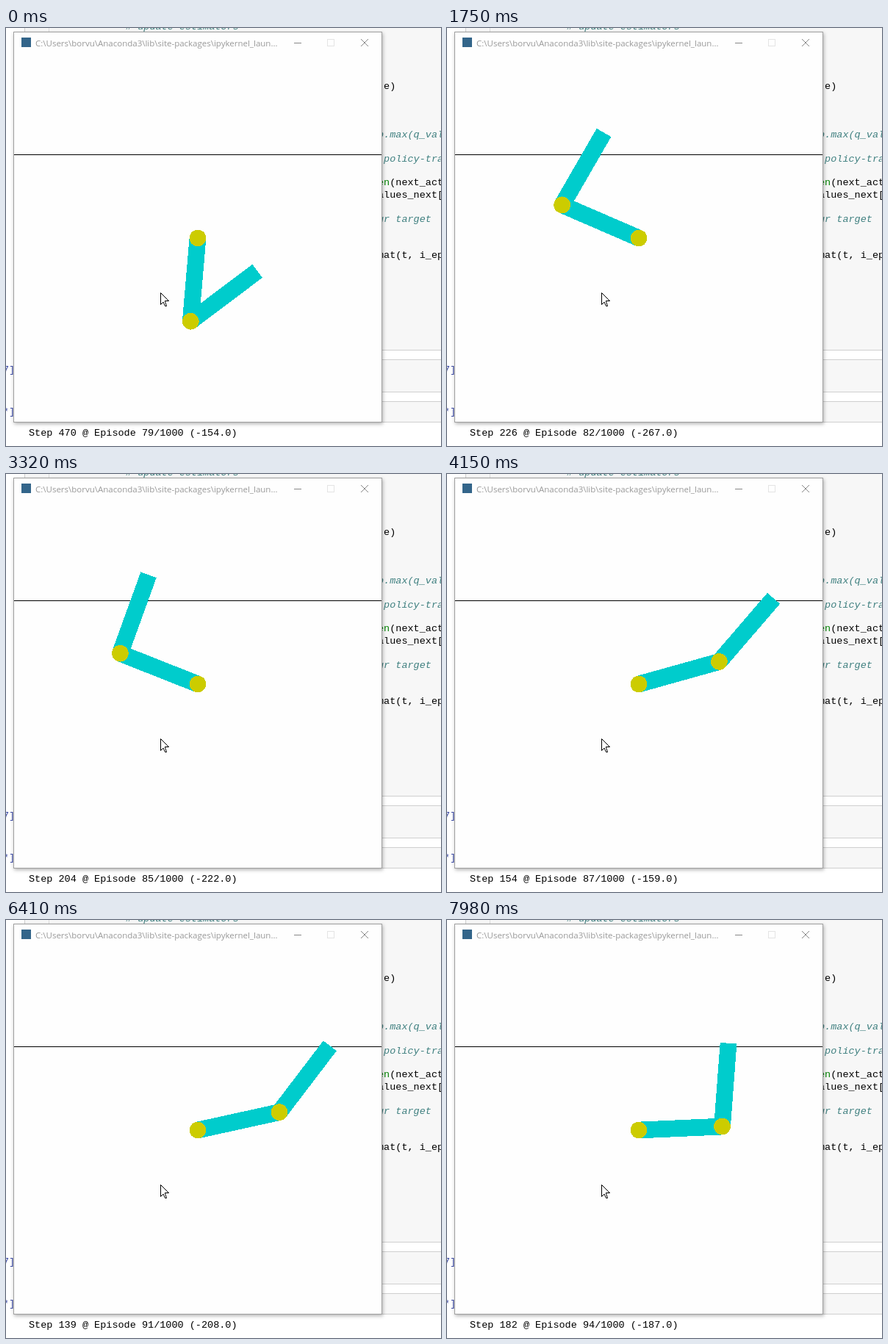
An HTML page that plays this animation: 592 px wide and 569 px high, repeating every 8000 ms.

```html
<!DOCTYPE html>
<html lang="en">
<head>
<meta charset="utf-8">
<title>Acrobot training</title>
<style>
  html, body { margin: 0; width: 100%; height: 100%; overflow: hidden; background: #fff; }
  svg { display: block; }
  text { white-space: pre; }
  .mono { font: 13.5px "Liberation Mono", "Courier New", monospace; fill: #000; }
  .comment { font-style: italic; fill: #408080; }
  .builtin { fill: #008000; }
  .prompt { fill: #303f9f; }
  .title { font: 11.5px "Open Sans", sans-serif; fill: #999; }
  .cell { fill: #f7f7f7; stroke: #cfcfcf; }
  .window { fill: #fefefe; stroke: #a0a0a0; filter: drop-shadow(1px 2px 2.5px rgba(0, 0, 0, .3)); }
  .link { fill: #0cc; shape-rendering: crispEdges; }
  .joint { fill: #cc0; shape-rendering: crispEdges; }
</style>
</head>
<body>
<svg width="592" height="569" viewBox="0 0 592 569">
  <defs>
    <g id="segment">
      <rect class="link" y="-11.36" width="113.64" height="22.73"/>
      <circle class="joint" r="11.36"/>
    </g>
  </defs>

  <!-- notebook -->
  <rect class="cell" x="25.5" y="-9.5" width="600" height="448"/>
  <path d="M58.5 0V5" stroke="#ddd"/>
  <rect class="cell" x="25.5" y="451.5" width="600" height="44"/>
  <rect class="cell" x="25.5" y="508.5" width="600" height="28"/>
  <text class="mono comment" x="163" y="2"># update estimators</text>
  <g class="mono">
    <text x="506" y="83"> e)</text>
    <text x="506" y="149" class="comment">p.max(q_val</text>
    <text x="506" y="182" class="comment"> policy-tra</text>
    <text x="506" y="214"><tspan class="builtin">en</tspan>(next_act</text>
    <text x="506" y="231">alues_next[</text>
    <text x="506" y="264" class="comment">ur target</text>
    <text x="506" y="313">mat(t, i_ep</text>
  </g>
  <text class="mono prompt" x="-4" y="469">7]</text>
  <text class="mono prompt" x="-4" y="526">*]</text>
  <text class="mono" id="status" x="31" y="555"></text>

  <!-- window -->
  <rect class="window" x="10.5" y="5.5" width="501" height="531"/>
  <rect x="21" y="13" width="13" height="13" fill="#33658a"/>
  <text class="title" x="40" y="24.5">C:\Users\borvu\Anaconda3\lib\site-packages\ipykernel_laun...</text>
  <g fill="none">
    <path d="M392 20.5H402" stroke="#888"/>
    <rect x="437.5" y="15.5" width="9" height="9" stroke="#e4e4e4"/>
    <path d="M483 15L493 25M493 15L483 25" stroke="#888"/>
  </g>

  <!-- acrobot -->
  <path d="M11 172.5H511" stroke="#000"/>
  <use href="#segment" id="upper"/>
  <use href="#segment" id="lower"/>
  <path d="M210.5 360.5V376.5L214 373L216.5 378.5H218.5L216.3 371.5H221.5Z" fill="#fff" stroke="#000"/>
</svg>
<script>
const LOOP = 8000;
const TICK = 132.8;
const STEPS_PER_TICK = 55.3;
const FIRST_STEP = 470;
const FIRST_EPISODE = 79;
const TEXT_LAG = 40; // steps by which the printed line trails the window
const LEAN = 7;
const PIVOT = { x: 261, y: 286 };
const LINK = 113.64;

// Each episode prints the length of the one before it as its return
const LENGTHS = [500, 196, 267, 263, 201, 222, 222, 159, 281, 196, 270, 208, 217, 217, 187, 230];
const RETURNS = [154, ...LENGTHS];

// Final poses of key episodes, link angles in degrees
const POSES = [
  { episode: 79, a: -94.9, b: 37 },
  { episode: 80, a: 170.6, b: 60 },
  { episode: 83, a: 172.4, b: 70.1 },
  { episode: 86, a: 15.6, b: 49.3 },
  { episode: 88, a: 63.3, b: 27.2 },
  { episode: 90, a: 12.4, b: 52.7 },
  { episode: 93, a: 2.5, b: 85.7 }
];

const byId = id => document.getElementById(id);
const status = byId("status"), upper = byId("upper"), lower = byId("lower");

function locate(step) {
  let index = 0;
  while (step >= LENGTHS[index]) step -= LENGTHS[index++];
  return { index, step };
}

function statusText(total) {
  const { index, step } = locate(total);
  // A shorter line leaves the end of the longer one behind it
  const leftover = "0)".slice(String(step).length - 1);
  return `Step ${step} @ Episode ${FIRST_EPISODE + index}/1000 (-${RETURNS[index]}.0)${leftover}`;
}

// Between key episodes the upper link ends a little nearer to upright each time
function finalPose(episode) {
  const { episode: key, a, b } = POSES.findLast(p => p.episode <= episode);
  return { a: a + Math.sign(90 - a) * LEAN * (episode - key), b };
}

function place(node, x, y, angle) {
  node.setAttribute("transform", `translate(${x} ${y}) rotate(${-angle})`);
}

function draw(tick) {
  const total = FIRST_STEP + Math.round(tick * STEPS_PER_TICK);
  const { a, b } = finalPose(FIRST_EPISODE + locate(total + TEXT_LAG).index - 1);
  const rad = a * Math.PI / 180;
  place(upper, PIVOT.x, PIVOT.y, a);
  place(lower, PIVOT.x + LINK * Math.cos(rad), PIVOT.y - LINK * Math.sin(rad), b);
  status.textContent = statusText(total);
}

const origin = performance.now();
let shown;
function frame(now) {
  const elapsed = Math.max(0, now - origin) % LOOP;
  let tick = Math.floor(elapsed / TICK);
  if (tick % 4 === 2) tick--; // every fourth refresh is dropped
  if (tick !== shown) draw(shown = tick);
  requestAnimationFrame(frame);
}
frame(origin);
</script>
</body>
</html>
```
